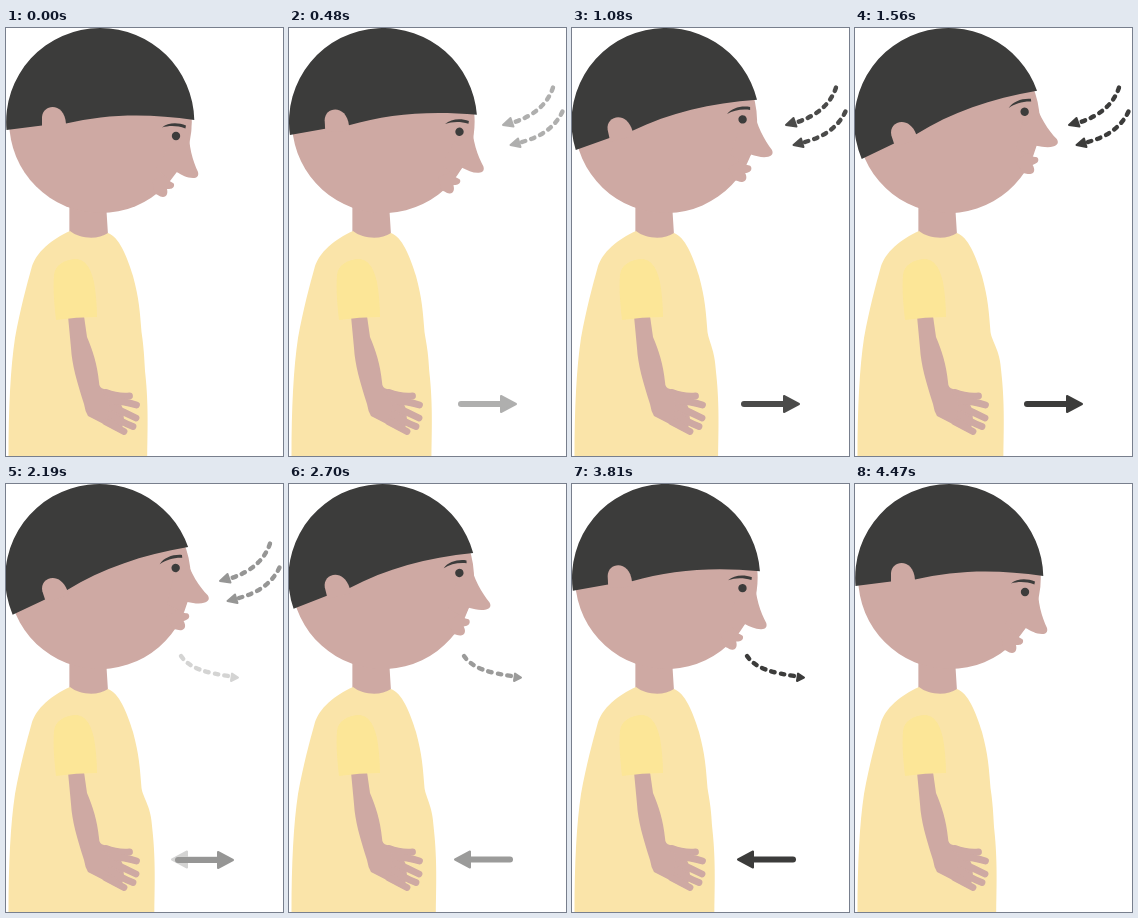
Write an HTML page with a canvas that moves like this. It is 277x428 px and loops after 4500 ms.

```html
<!DOCTYPE html>
<html lang="en">
<head>
<meta charset="utf-8">
<title>Breathing</title>
<style>
  html, body { margin: 0; width: 100%; height: 100%; overflow: hidden; background: #fff; }
  canvas { display: block; width: 277px; height: 428px; }
</style>
</head>
<body>
<canvas id="stage" width="277" height="428"></canvas>
<script>
const ctx = document.getElementById('stage').getContext('2d');
const LOOP = 4500, STEP = 30, INHALE_END = 1800;
const MAX_TILT = 19 * Math.PI / 180;
const PIVOT = { x: 94, y: 97 };
const DARK = '#3c3c3b', SKIN = '#cea9a3', SHIRT = '#fae4a9', SLEEVE = '#fce697';

const clamp = v => Math.min(1, Math.max(0, v));
const ramp = (t, from, to) => clamp((t - from) / (to - from));
const easeInOut = p => (1 - Math.cos(Math.PI * p)) / 2;

function fill(path, color) {
  ctx.fillStyle = color;
  ctx.fill(new Path2D(path));
}

function stroke(path, color, width, dash = []) {
  ctx.strokeStyle = color;
  ctx.lineWidth = width;
  ctx.lineCap = ctx.lineJoin = 'round';
  ctx.setLineDash(dash);
  ctx.stroke(new Path2D(path));
  ctx.setLineDash([]);
}

function disc(x, y, r, color) {
  ctx.fillStyle = color;
  ctx.beginPath();
  ctx.arc(x, y, r, 0, 2 * Math.PI);
  ctx.fill();
}

function wipe(alpha = 1) {
  ctx.globalAlpha = alpha;
  ctx.fillStyle = '#fff';
  ctx.fillRect(0, 0, 277, 428);
  ctx.globalAlpha = 1;
}

function dashedCurve(path) {
  stroke(path, DARK, 4.4, [3.6, 6.2]);
}

function arrowHead(path) {
  fill(path, DARK);
  stroke(path, DARK, 2);
}

function drawHead(tilt) {
  ctx.save();
  ctx.translate(PIVOT.x, PIVOT.y);
  ctx.rotate(-tilt);
  ctx.translate(-PIVOT.x, -PIVOT.y);

  disc(94.5, 93.8, 91.3, SKIN);
  // Nose, then both lips
  fill('M178 96 L183 98 C182 118 187 133 192 144 C193 148 191 150 187 150 ' +
       'C181 150 176 147 170.5 144 L163 152 L150 140 Z', SKIN);
  fill('M160 148 L163 152 C165 155 169 154 168 158 C167 161 164 161 161 161 ' +
       'C162 165 161 169 157 169 C153 169 152 166 149 166 L146 152 Z', SKIN);

  // The hair cap is slightly more than a half circle
  fill('M0.5 102 A94 94 0 0 1 94.3 0 A94 94 0 0 1 188.3 92 ' +
       'C142 85 100 86 60 95.5 L36 97.5 Z', DARK);
  fill('M36 101 L36 89 C37 75 59 74 60 96 L60 101 Z', SKIN);

  fill('M156 99.5 C162 94.4 172 94.2 180 97.6 L179.4 100.4 C171 97.4 163 97.4 156 99.5 Z', DARK);
  disc(170, 108, 4.2, DARK);
  ctx.restore();
}

function drawBody(breath) {
  const belly = 142 + 7.5 * breath;
  const waist = 138 + 7.5 * breath;
  fill('M64 203 C74 211 92 212 102 205 C113 209 121 228 127 248 ' +
       `C133 270 134 284 135.5 304 C137 314 ${waist} 322 ${waist + 1} 343 ` +
       `C${belly} 370 ${belly} 390 ${belly - 0.8} 428 L2.5 428 ` +
       'C2.5 380 4.5 340 9 310 C14.5 280 20.5 258 25.5 240 C30 224 46 211 64 203 Z', SHIRT);

  fill('M62 288 L78 288 L81 309 C87 323 91 336 93 354 Q93 360 98 361 ' +
       'L110 365 L117 381 L118 392 L115 405 L82 388 Q79 383 78 376 ' +
       'C71 354 66 337 65 320 Z', SKIN);
  for (const finger of ['M100 364.5 Q111 369 123.5 368', 'M106 373 Q118 373 130.5 377',
                        'M106 379 Q118 384 130 390', 'M104 386 Q115 394 127 398.5',
                        'M100 394 L118 403.5']) {
    stroke(finger, SKIN, 6.8);
  }

  fill('M50 292 C48 274 47 260 48 247 C49 237 58 232 69 231 ' +
       'C80 231 85 241 88 254 C90 266 91 278 91 289 Q70 289 50 292 Z', SLEEVE);
}

function drawInhaleArrows() {
  dashedCurve('M264 59.5 C258.5 76.5 244 88.5 222.5 95');
  arrowHead('M214 97 L221.5 90 L224.5 98.5 Z');
  dashedCurve('M273.5 83.5 C266 99.5 251 109.5 231 114.5');
  arrowHead('M221.5 117 L229 110.5 L231.5 119 Z');
  stroke('M172 376 H212', DARK, 6);
  arrowHead('M227 376 L212 368 V384 Z');
}

function drawExhaleArrows() {
  dashedCurve('M175 172 C184 185 201 189 226 192.5');
  arrowHead('M232 193.5 L226 189.5 L225 197 Z');
  stroke('M221 375.5 H181', DARK, 6);
  arrowHead('M166 375.5 L181 367.5 V383.5 Z');
}

// Fading by a white veil keeps overlapping parts one even tone
function drawArrows(inhale, exhale) {
  const [faint, strong] = [
    { alpha: inhale, draw: drawInhaleArrows },
    { alpha: exhale, draw: drawExhaleArrows }
  ].sort((a, b) => a.alpha - b.alpha);
  if (faint.alpha > 0) {
    faint.draw();
    wipe(1 - faint.alpha / strong.alpha);
  }
  if (strong.alpha > 0) {
    strong.draw();
    wipe(1 - strong.alpha);
  }
}

function render(t) {
  const breath = t < INHALE_END
    ? easeInOut(t / INHALE_END)
    : 1 - easeInOut(ramp(t, INHALE_END, LOOP));
  const inhale = ramp(t, 0, 1170) * (1 - ramp(t, INHALE_END, 2650));
  const exhale = ramp(t, INHALE_END, 3550) * (1 - ramp(t, 3825, 4275));

  wipe();
  drawArrows(inhale, exhale);
  fill('M63.4 172 H99.8 L102 207 Q84 216 63.4 205 Z', SKIN);
  drawHead(MAX_TILT * breath);
  drawBody(breath);
}

const start = performance.now();
function frame() {
  const t = (performance.now() - start) % LOOP;
  render(Math.floor(t / STEP) * STEP);
  requestAnimationFrame(frame);
}
frame();
</script>
</body>
</html>
```
